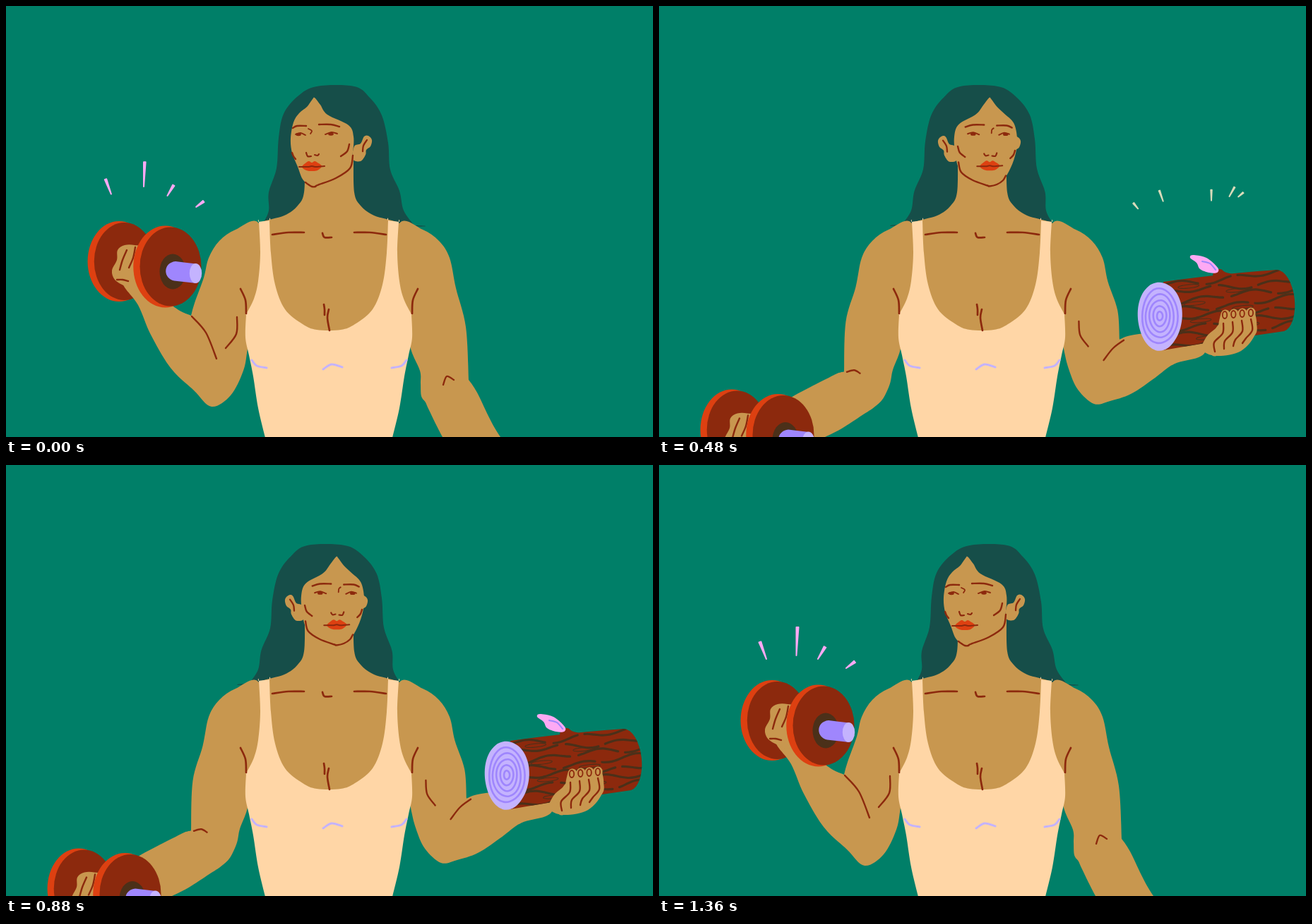
An HTML page for the animation above (1.44 s loop, 916 by 611 pixels).

```html
<!DOCTYPE html>
<html lang="en">
<head>
<meta charset="utf-8">
<title>Lifting</title>
<style>
html, body { margin: 0; width: 100%; height: 100%; overflow: hidden; background: #007f68; }
svg { display: block; width: 100vw; height: 100vh; }
</style>
</head>
<body>
<svg id="stage" viewBox="0 0 916 611"></svg>
<script>
const STEP = 80, STEPS = 18, WIDTH = 915;
const C = {
  hair: '#164e49', skin: '#c8974f', top: '#ffd6a6', brown: '#8c290d', red: '#dd4011',
  dark: '#4b3019', violet: '#9f86fd', pale: '#c4b3fe', pink: '#fea9f4', cream: '#d9dbba'
};
const stage = document.getElementById('stage');
const movers = [];

function add(tag, attrs, parent = stage) {
  const el = document.createElementNS('http://www.w3.org/2000/svg', tag);
  for (const k in attrs) el.setAttribute(k, attrs[k]);
  return parent.appendChild(el);
}

// Smooth curve through flat x,y pairs; a doubled point makes a corner
function curve(f, closed) {
  const n = f.length / 2;
  const at = i => {
    const j = closed ? (i + n) % n : Math.max(0, Math.min(n - 1, i));
    return [f[2 * j], f[2 * j + 1]];
  };
  let d = `M${at(0)}`;
  for (let i = 0; i < (closed ? n : n - 1); i++) {
    const [a, b, c, e] = [at(i - 1), at(i), at(i + 1), at(i + 2)];
    const h1 = b.map((v, k) => v + (c[k] - a[k]) / 6);
    const h2 = c.map((v, k) => v - (e[k] - b[k]) / 6);
    d += `C${h1} ${h2} ${c}`;
  }
  return closed ? d + 'Z' : d;
}

// Polynomial through evenly spaced keys, t from -1 (first) to 1 (last)
function tween(keys, t) {
  const x = (t + 1) / 2 * (keys.length - 1);
  const w = keys.map((_, i) => keys.reduce((m, _, j) => j === i ? m : m * (x - j) / (i - j), 1));
  return keys[0].map((_, k) => keys.reduce((sum, key, i) => sum + w[i] * key[k], 0));
}

// Left half plus its mirror image, as one outline
function whole(keys, t, width = WIDTH) {
  const f = tween(keys, t), g = tween(keys, -t);
  for (let i = g.length - 2; i >= 0; i -= 2) f.push(width - g[i], g[i + 1]);
  return f;
}

const pen = (color = C.brown, width = 2.4) =>
  ({ fill: 'none', stroke: color, 'stroke-width': width, 'stroke-linecap': 'round', 'stroke-linejoin': 'round' });
const shape = (f, fill, parent) => add('path', { d: curve(f, true), fill }, parent);
const mark = (f, color, width, parent) => add('path', { d: curve(f), ...pen(color, width) }, parent);
const oval = (cx, cy, rx, ry, fill, parent) => add('ellipse', { cx, cy, rx, ry, fill }, parent);

function moving(attrs, outline, closed, parent) {
  const el = add('path', attrs, parent);
  movers.push(t => el.setAttribute('d', curve(outline(t), closed)));
  return el;
}
function carrier(keys, parent, side = 1) {
  const g = add('g', {}, parent);
  movers.push(t => g.setAttribute('transform', `translate(${tween(keys, side * t)})`));
  return g;
}
// Draws a left part and its mirrored twin, which runs the motion backwards
function both(make) {
  make(add('g', {}), 1);
  make(add('g', { transform: `translate(${WIDTH}) scale(-1 1)` }), -1);
}
const twinLine = (keys, width) => both((g, side) => moving(pen(C.brown, width), t => tween(keys, side * t), false, g));

add('rect', { width: 916, height: 611, fill: '#007f68' });

// Hair
const hair = [
  [440,114, 413,128, 393,153, 386,187, 383,230, 372,264, 372,290, 364,308, 364,308],
  [422,114, 400,130, 383,155, 374,194, 371,232, 358,262, 352,290, 337,311, 337,311]
];
moving({ fill: C.hair }, t => whole(hair, t), true);

// Neck and chest
shape(whole([[423,215, 423,215, 422,264, 413,283, 394,297, 358,308, 330,330, 345,445, 450,480]], 0), C.skin);

// Ears
both((g, side) => {
  const ear = carrier([[16, 0], [0, 0], [0, -1]], g, side);
  shape([397,191, 402,185, 408,186, 413,196, 422,200, 424,218, 413,221, 406,212, 405,205, 399,200], C.skin, ear);
  mark([404,191, 409,199, 410,207], C.brown, 2.3, ear);
});

// Face
const face = [
  [434,132, 426,143, 415,152, 407,165, 403,188, 405,208, 413,228, 421,247, 436,257],
  [478,130, 470,140, 460,154, 430,169, 423,185, 424,207, 429,232, 450,247, 476,257]
];
const jaw = [
  [424,250, 428,253, 433,256, 438,256],
  [424,212, 428,230, 448,244, 474,254]
];
moving({ fill: C.skin }, t => whole(face, t), true);
moving(pen(), t => whole(jaw, t), false);

twinLine([[406,173, 412,170, 425,170], [443,171, 455,168, 472,168]]);
twinLine([[410,182, 417,180, 424,183], [446,181, 454,179, 463,182]], 1.9);
twinLine([[425,208, 427,213, 432,213], [472,210, 474,212, 478,211]], 2.2);
twinLine([[405,208, 407,213, 410,217], [429,196, 432,206, 441,213]]);
both((g, side) => oval(0, 0, 3.8, 2.2, C.brown, carrier([[414, 182], [455, 181.5]], g, side)));
const frown = [[428,174, 433,177, 431,181], [489,173, 484,175, 484,180]];
moving(pen(C.brown, 1.8), t => tween(frown, t));

const mouth = carrier([[433, 227], [480, 226]]);
shape([-14,1, -8,-5, -4,-7, 0,-5, 4,-7, 8,-5, 14,0, 8,6, 0,7, -8,6], C.red, mouth);
mark([-18,1, -6,1, 0,0, 6,1, 18,0], C.brown, 2, mouth);

// Dumbbell plate: red rim, brown disc
const bellPath = [[0, 0], [-65, 165], [-22, 306]];
const plate = (x, y, r, parent) => {
  oval(x, y, r * .78, r, C.red, parent);
  oval(x + 7.500, y, r * .75, r - 2, C.brown, parent);
};
plate(160, 362, 57, carrier(bellPath));

// Arms: raised, level, lowered
const shoulder = [358,308, 325,317, 302,333, 287,357];
const armpit = [342,486, 350,440, 372,380];
const arm = [
  [280,385, 267,421, 262,439, 262,439, 240,428, 196,392, 180,372, 165,392, 187,424, 205,466, 233,513, 266,545, 291,568, 318,552, 336,517],
  [279,395, 265,440, 263,499, 263,499, 240,498, 150,515, 115,537, 152,574, 200,570, 230,571, 265,572, 290,568, 308,560, 325,538, 333,515],
  [278,400, 264,455, 260,530, 260,530, 248,548, 215,611, 158,678, 255,670, 280,635, 297,611, 316,573, 321,562, 327,553, 328,535, 329,517]
];
both((g, side) => moving({ fill: C.skin }, t => [...shoulder, ...tween(arm, side * t), ...armpit], true, g));

// Tank top
shape(whole([[440,459, 420,451, 395,430, 381,395, 375,350, 373,304, 373,304, 358,306, 358,306, 360,350, 357,390, 351,415, 340,437,
  340,437, 339,470, 344,495, 350,525, 357,570, 367,612, 367,612]], 0, 914), C.top);
both(g => {
  mark([348,502, 355,510, 369,513], C.pale, 3, g);
  mark([377,324, 400,321, 422,321], C.brown, 2.7, g);
  mark([332,401, 339,417, 340,436], C.brown, 2.7, g);
});
mark([449,515, 461,508, 476,512], C.pale, 3);
mark([448,322, 451,328, 461,328], C.brown, 2.7);
mark([450,423, 451,430, 451,438], C.brown, 2.7);
mark([457,430, 455,442, 458,460], C.brown, 2.7);

// Elbow crease and biceps
twinLine([[263,440, 283,463, 298,500], [258,500, 270,503, 281,509], [281,530, 291,525, 296,537]]);
const biceps = [[327,441, 326,465, 311,485], [314,453, 312,468, 304,480], [300,465, 300,470, 298,475]];
both((g, side) => {
  moving(pen(), t => tween(biceps, side * t), false, g);
  movers.push(t => g.setAttribute('visibility', side * t > 0 ? 'hidden' : 'visible'));
});

// Fist and front of the dumbbell
const bell = carrier(bellPath);
shape([158,346, 168,339, 182,339, 200,346, 195,390, 182,402, 168,397, 154,388, 150,375, 157,360], C.skin, bell);
mark([171,346, 165,360, 161,374], C.brown, 2.4, bell);
mark([183,342, 180,357, 174,371], C.brown, 2.4, bell);
mark([157,388, 165,388, 173,390], C.brown, 2.4, bell);
plate(225.5, 369.5, 58, bell);
oval(236, 376.5, 18.5, 25, C.dark, bell);
add('path', { d: 'M240 362L269 365.500V393L238 389.500C222 386 222 364 240 362Z', fill: C.violet }, bell);
oval(268.5, 379, 8.700, 14, C.pale, bell);

// Log
const log = carrier([[10, 210], [6, 85], [0, 0], [9, -83], [-33, -152]]);
shape([777,468, 778,458, 786,456, 792,460, 803,464, 803,470], C.brown, log);
const bark = 'M705 474Q790 462 866 457A22 44 -6 0 1 876 544Q790 556 705 571Z';
add('path', { d: bark, fill: C.brown }, log);
add('path', { d: bark }, add('clipPath', { id: 'bark' }, log));
const grain = add('g', { transform: 'rotate(-6 700 523)' }, add('g', { 'clip-path': 'url(#bark)' }, log));
for (let r = 0; r < 8; r++) {
  const f = [], y = 479 + r * 12.5;
  for (let x = 700; x < 910; x += 10)
    f.push(x, y + 3.5 * Math.sin(x / 12 + r * 2.1) + 2 * Math.sin(x / 29 + r * 4));
  mark(f, C.dark, 3.2, grain).setAttribute('stroke-dasharray', `${60 + r * 17 % 40} 12 ${36 + r * 11 % 23} 10`);
  oval(745 + r * 67 % 128, y + 6, 15, 2.5, 'none', grain).setAttribute('stroke', C.dark);
}
function ring(k) {
  const f = [];
  for (let a = 0; a < 6.2; a += Math.PI / 9) {
    const w = k * (1 + .02 * Math.sin(3 * a + k * 9));
    f.push(700 + 31.500 * w * Math.cos(a), 522.5 + 48.500 * w * Math.sin(a));
  }
  return f;
}
shape(ring(1), C.pale, log);
for (let k = .8; k > .1; k -= .168) add('path', { ...pen(C.violet, 2.6), d: curve(ring(k), true) }, log);
// Bud
shape([743,440, 747,436, 766,440, 782,454, 781,461, 770,461, 757,456, 752,447], C.pink, log);
mark([760,445, 771,448, 779,457], C.violet, 2, log);

// Fingers
const finger = i => [790 + 13 * i,533 - 2 * i, 789 + 14 * i,547 - 1.5 * i, 777 + 15 * i,560 - 2 * i, 778 + 13 * i,573 - 4 * i];
shape([766,552, 778,541, 790,530, 830,515, 836,545, 815,572, 780,579, 760,570], C.skin, log);
for (let i = 0; i < 4; i++) mark([793 + 12 * i, 520 - i, ...finger(i)], C.skin, 13, log);
for (let i = 0; i < 4; i++) {
  mark(finger(i), C.brown, 2.4, log);
  add('ellipse', { ...pen(C.brown, 1.8), cx: 792 + i * 12.300, cy: 521 - i, rx: 3.200, ry: 5 }, log);
}

// Sparks: each ray is an inner end and a vector; it flies out along itself, longest halfway
function sparks(color, rays) {
  const el = add('path', { fill: color, stroke: color, 'stroke-width': 2, 'stroke-linejoin': 'round' });
  return age => {
    const s = age - 2, size = 1 - .13 * s * s;
    const d = rays.map(([x, y, dx, dy]) => {
      const u = x + .35 * s * dx, v = y + .35 * s * dy, w = 1.5 * size / Math.hypot(dx, dy);
      const ox = u + dx * size, oy = v + dy * size;
      return `M${ox - dy * w} ${oy + dx * w}L${u} ${v}L${ox + dy * w} ${oy - dx * w}Z`;
    });
    el.setAttribute('d', age < 5 ? d.join('') : '');
  };
}
const sparkL = sparks(C.pink, [[152,275,-9,-24], [194.5,270,1.5,-40], [225,275,10,-17], [265,288,12,-9]]);
const sparkR = sparks(C.cream, [[669,276,-13,-16], [706,255,-11,-31], [782,254,0,-31], [818,251,15,-27], [830,262,14,-12]]);

let last = -1;
function draw(time) {
  const n = Math.floor(time / STEP) % STEPS;
  if (n === last) return;
  last = n;
  // Sweep from left side up (-1) to right side up (1) and back
  const t = Math.min(n, STEPS - 1 - n) / 4 - 1;
  for (const move of movers) move(t);
  sparkL((n + 3) % STEPS);
  sparkR((n + 12) % STEPS);
}
const start = performance.now();
function tick() {
  draw(performance.now() - start);
  requestAnimationFrame(tick);
}
tick();
</script>
</body>
</html>
```
